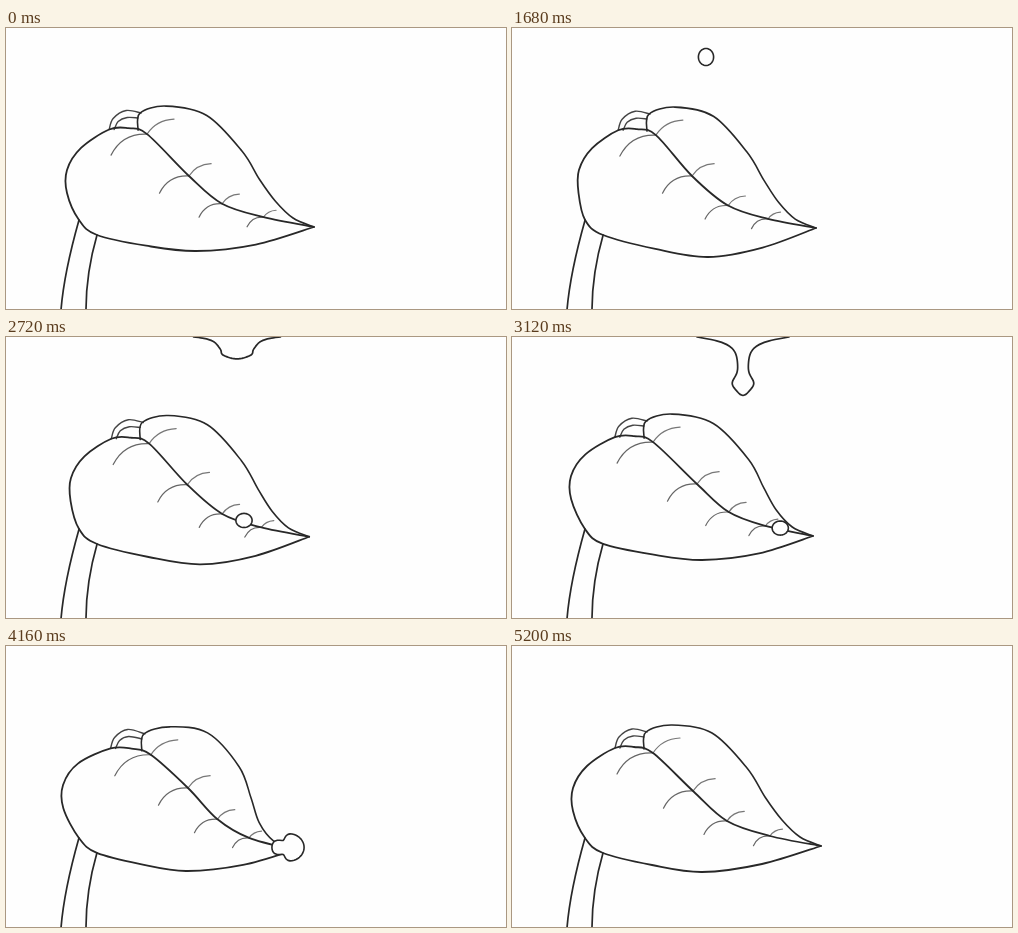
An HTML page with a canvas that plays this animation: 500 by 281 pixels, repeating every 5280 ms.

```html
<!DOCTYPE html>
<html>
<head>
<meta charset="utf-8">
<style>
html, body { margin: 0; height: 100%; overflow: hidden; background: #fefefe; }
canvas { display: block; }
</style>
</head>
<body>
<canvas id="stage" width="500" height="281"></canvas>
<script>
const ctx = document.getElementById('stage').getContext('2d');
const LOOP = 5280, STEP = 80, PAPER = '#fefefe', INK = '#282828';

// Leaf at rest: midrib, front lobe and back lobe, all meeting at the tip.
const tip = [309, 200];
const rib = [tip, [258, 190], [215, 175], [181, 145], [141, 107], [122, 101], [103, 102]];
const lobe = [[75, 120], [61, 142], [61, 165], [73, 192], [91, 207],
  [140, 219], [190, 226], [250, 218], tip];
const back = [[132, 103], [134, 86], [160, 79], [200, 87], [235, 122],
  [253, 151], [270, 174], [288, 191], tip];

// Handles that bend the leaf: left side, crown, middle, belly, tip; the stalk joint stays put.
const handles = [[61, 150], [145, 92], [181, 145], [190, 226], tip, [80, 197]];
const pose = {
  rest: [0, 0, 0, -1, 2, 3, 0, -3, -1, -1],
  dip: [12, 8, 11, 20, -1, 14, 10, 9, -18, 10],
  calm: [6, 0, 3, 0, -1, 3, 6, 3, -5, 0],
  hit: [15, 0, 10, 2, 4, 3, -5, 3, -22, -2],
  slide: [-2, -3, 0, -2, 4, 2, 0, -3, -8, -1],
  heavy: [-4, -3, 4, 2, 1, -3, -10, -1, -21, 4],
  spring: Array(10).fill(0)
};
const sway = [[0, 'rest'], [240, 'calm'], [480, 'calm'], [880, 'dip'], [1200, 'spring'],
  [1440, 'calm'], [1920, 'calm'], [2240, 'hit'], [2520, 'calm'], [3120, 'slide'],
  [3440, 'slide'], [3600, 'hit'], [3880, 'spring'], [4160, 'heavy'], [4640, 'heavy'],
  [4960, 'spring'], [5200, 'spring'], [LOOP, 'rest']];

const mix = (a, b, k) => a + (b - a) * k;
const ramp = (t, from, to) => Math.min(1, Math.max(0, (t - from) / (to - from)));
const smooth = k => k * k * (3 - 2 * k);
const bump = (x, center, width) => Math.exp(-(((x - center) / width) ** 2));
const fall = age => .12 * age + .001 * age * age;

function bendAt(t) {
  const n = sway.findIndex(key => key[0] > t);
  const [[t0, a], [t1, b]] = [sway[n - 1], sway[n]];
  const k = smooth(ramp(t, t0, t1));
  const shift = pose[a].map((v, i) => mix(v, pose[b][i], k));
  // Each point follows the handles near it.
  return ([x, y]) => {
    let sum = 0, dx = 0, dy = 0;
    handles.forEach(([hx, hy], i) => {
      const w = ((x - hx) ** 2 + (y - hy) ** 2 + 50) ** -1.5;
      sum += w;
      dx += w * (shift[2 * i] ?? 0);
      dy += w * (shift[2 * i + 1] ?? 0);
    });
    return [x + dx / sum, y + dy / sum];
  };
}

function stroke(width, color = INK) {
  ctx.lineWidth = width;
  ctx.strokeStyle = color;
  ctx.stroke();
}

// Smooth line through the points.
function curve(pts, width, color) {
  const at = i => pts[Math.max(0, Math.min(pts.length - 1, i))];
  ctx.beginPath();
  ctx.moveTo(...pts[0]);
  for (let i = 0; i < pts.length - 1; i++) {
    const [a, b, c, d] = [at(i - 1), at(i), at(i + 1), at(i + 2)];
    ctx.bezierCurveTo(b[0] + (c[0] - a[0]) / 6, b[1] + (c[1] - a[1]) / 6,
      c[0] - (d[0] - b[0]) / 6, c[1] - (d[1] - b[1]) / 6, ...c);
  }
  stroke(width, color);
}

function arc([x, y], cx, cy, ex, ey, width, color) {
  ctx.beginPath();
  ctx.moveTo(x, y);
  ctx.quadraticCurveTo(cx, cy, ex, ey);
  stroke(width, color);
}

function drawLeaf(bend) {
  const front = [...rib, ...lobe].map(bend), far = back.map(bend);
  const [left, right] = [lobe[3], lobe[4]].map(bend);
  arc(left, left[0] - 15, 245, 55, 282, 1.7);
  arc(right, right[0] - 11, 245, 80, 282, 1.7);

  const [jx, jy] = front[6], [ux, uy] = far[1];
  curve([[jx, jy], [jx + 4, jy - 11], [jx + 17, jy - 19], [ux + 1, uy]], 1.4, '#444');
  curve([[jx + 5, jy], [jx + 9, jy - 8], [jx + 18, jy - 12], [ux - 2, uy + 5]], 1.4, '#444');

  front.slice(1, 5).reverse().forEach((m, i) => {
    const [x, y] = m, s = 1 - .18 * i;
    arc(m, x - 25 * s, y - 1, x - 36 * s, y + 21 * s, 1.2, '#666');
    arc(m, x + 9 * s, y - 14 * s, x + 27 * s, y - 15 * s, 1.2, '#777');
  });
  curve(far, 1.6);
  curve(front, 1.8);
}

// Height of the bent midrib at x.
function ribHeight(bend, x) {
  const pts = rib.map(bend);
  const i = Math.max(1, pts.findIndex(p => p[0] <= x));
  const [a, b] = [pts[i], pts[i - 1]];
  return mix(a[1], b[1], (x - a[0]) / (b[0] - a[0]));
}

// Round drop; dent notches the top, lump pinches it into two unequal halves.
function drawDrop(x, y, rx, ry, dent = 0, lump = 0) {
  ctx.beginPath();
  for (let i = 0; i < 48; i++) {
    const a = (i / 24 - 1) * Math.PI;
    const r = 1 - .55 * dent * bump(a, -Math.PI / 2, .35) - .42 * lump * bump(Math.abs(a), 2.1, .4);
    ctx.lineTo(x + rx * r * Math.cos(a), y + ry * r * Math.sin(a));
  }
  ctx.closePath();
  ctx.fillStyle = PAPER;
  ctx.fill();
  stroke(1.6);
}

// Falls from the ceiling, dents on landing and slides down the midrib.
function fallingDrop(t, bend, { start, x, y, r, slide }) {
  const land = start + 320;
  if (t < land) return drawDrop(x, y + fall(t - start), r, r * 1.12);
  const px = mix(x, 282, smooth(ramp(t, land, land + slide)));
  const dent = Math.sin(Math.PI * ramp(t, land, land + 640));
  const lump = smooth(ramp(t, 3600, 4160));
  const size = r + .5 + 8 * lump;
  drawDrop(px, ribHeight(bend, px) - 1, size * (1 + .35 * dent), size * .87, dent, lump);
}

// The merged drop gathers below the tip and lets go.
function tipDrop(t, bend) {
  const k = smooth(ramp(t, 4240, 4560));
  const y = mix(ribHeight(bend, 282) - 1, 213, k) + fall(Math.max(0, t - 4560));
  drawDrop(mix(282, 287, k), y, mix(16.5, 9, k), mix(14.5, 12, k), 0, 1 - k);
}

// Water gathering at the ceiling: a flat dome that stretches into a neck and bulb.
function drawPool(t, { x, width, start, release, depth, recoil }) {
  const h = t < release ? depth * ramp(t, start, release)
    : .3 * depth * (1 - ramp(t, release, release + recoil));
  if (h <= 0) return;
  const k = Math.min(1, h / 45), n = 24, pts = [];
  for (let i = -n; i <= n; i++) {
    const f = Math.sin((1 - Math.abs(i) / n) * Math.PI / 2);
    const neck = width * Math.exp(-f / .1) + (5 + 6 * bump(f, .8, .14)) * Math.sqrt(1 - f ** 14);
    pts.push([x + Math.sign(i) * mix(width * Math.sqrt(1 - f), neck, k), h * f]);
  }
  curve(pts, 1.7);
}

const pools = [
  { x: 196, width: 33, start: 800, release: 1560, depth: 24, recoil: 80 },
  { x: 231, width: 41, start: 2480, release: 3160, depth: 62, recoil: 400 }
];
const drops = [
  { start: 1600, x: 194, y: 13, r: 7.6, slide: 1600, end: 4240 },
  { start: 3200, x: 232, y: 52, r: 10, slide: 400, end: 3920 }
];

function frame(now) {
  const t = Math.floor(now % LOOP / STEP) * STEP;
  const bend = bendAt(t);
  ctx.fillStyle = PAPER;
  ctx.fillRect(0, 0, 500, 281);
  drawLeaf(bend);
  pools.forEach(pool => drawPool(t, pool));
  drops.filter(d => t >= d.start && t < d.end).forEach(d => fallingDrop(t, bend, d));
  if (t >= 4240 && t < 4880) tipDrop(t, bend);
  requestAnimationFrame(frame);
}

ctx.lineJoin = ctx.lineCap = 'round';
requestAnimationFrame(frame);
</script>
</body>
</html>
```
